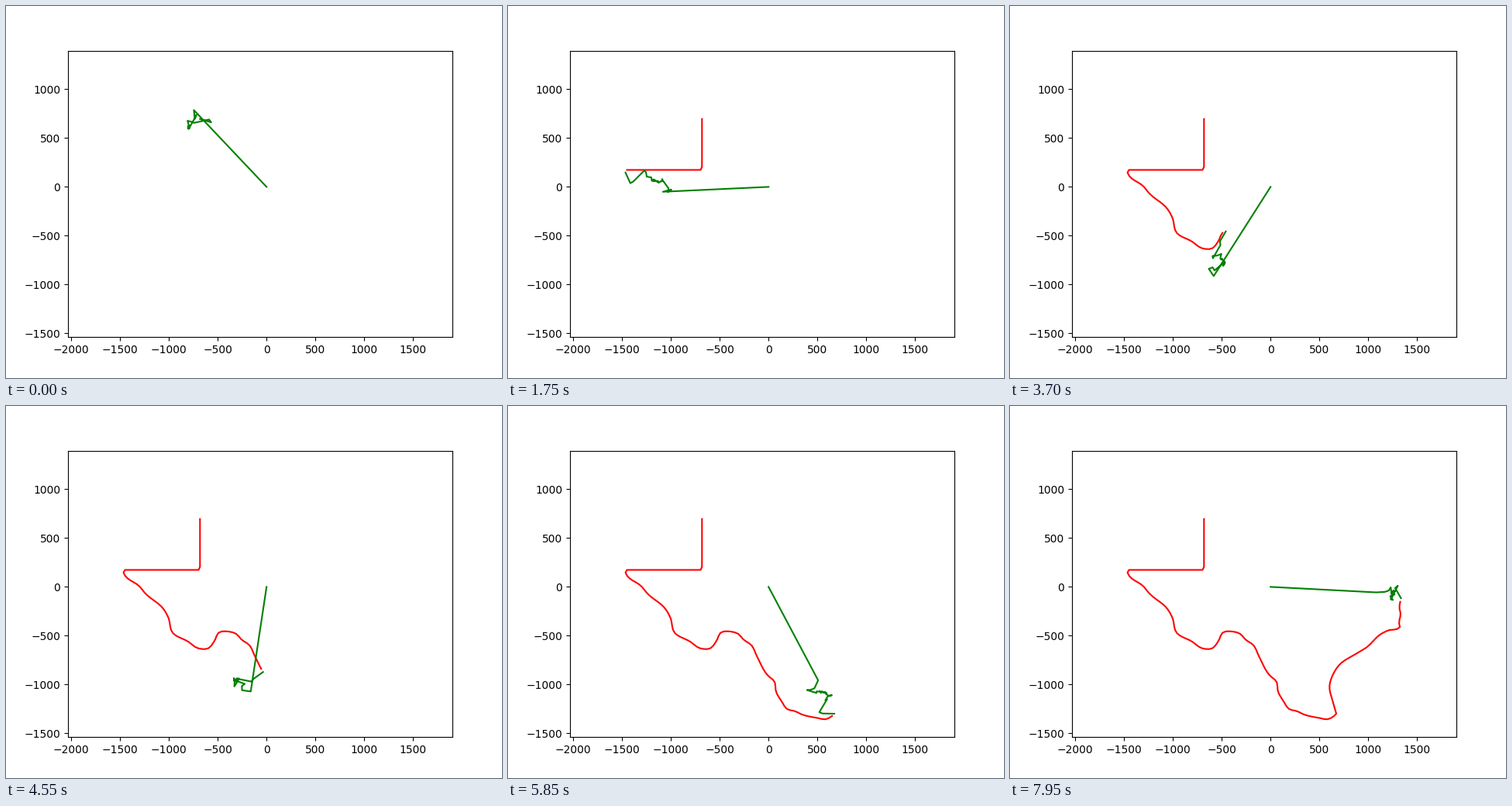
Recreate the animation shown at these times as a matplotlib script. Size 640 by 480 pixels, loop 8 s.

```python
import numpy as np
import matplotlib.pyplot as plt
from matplotlib.animation import FuncAnimation

N = 256             # samples round the whole outline
FRAMES = 160        # samples visited in one loop
SCALE = 0.126       # stage pixels per data unit
OX, OY = 336.2, 233.4

# Outline sections in stage pixels, in drawing order
WEST = [(250.3, 145.8), (250.3, 208.5), (249, 211.5), (153.5, 211.5), (151, 213.5)]
RIVER = [(151, 213.5), (153, 218), (172.5, 233), (179, 241), (204, 263), (209.5, 273),
         (214.5, 292), (235, 304), (247.5, 312.5), (261, 312.7), (268.5, 304),
         (275, 292), (287, 291), (297, 294), (304, 301.5), (314, 308.5),
         (321, 322.5), (336, 348.5), (343.5, 355), (346, 369), (353, 381),
         (360, 391), (371, 394), (378, 397.5), (399, 402.5), (410, 404.2),
         (421.3, 398)]
COAST = [(421.3, 398), (417, 383), (412.3, 361), (418, 344), (424.5, 334.5),
         (446, 320), (460, 311.5), (479, 294), (490, 289), (499, 288), (503, 285.5),
         (502, 280), (504, 268), (502.5, 261), (504.5, 248)]
NORTH = [(504.5, 248), (499, 229), (495, 211), (495, 165), (474, 160), (462, 155),
         (450, 159), (424, 160), (398, 151), (386, 153), (350, 140), (333, 133),
         (333, 81), (250.3, 81), (250.3, 145.8)]


def to_data(points):
    x, y = np.array(points, float).T
    return ((x - OX) + 1j * (OY - y)) / SCALE


def arc(z):
    return np.concatenate([[0], np.cumsum(np.abs(np.diff(z)))])


def smooth(z, steps=12):
    """Cubic Hermite curve through the points."""
    t = arc(z)
    m = np.gradient(z, t)
    h = np.diff(t)[:, None]
    u = np.linspace(0, 1, steps, endpoint=False)[None]
    a, b, ma, mb = z[:-1, None], z[1:, None], m[:-1, None], m[1:, None]
    curve = (a * (1 + 2 * u) * (1 - u) ** 2 + b * u**2 * (3 - 2 * u)
             + h * u * (1 - u) * (ma * (1 - u) - mb * u))
    return np.append(curve.ravel(), z[-1])


def resample(z, count):
    """Evenly spaced points along a path, without its end point."""
    s = arc(z)
    at = np.linspace(0, s[-1], count, endpoint=False)
    return np.interp(at, s, z.real) + 1j * np.interp(at, s, z.imag)


first = np.concatenate([to_data(WEST), smooth(to_data(RIVER))[1:],
                        smooth(to_data(COAST))[1:]])
z = np.concatenate([resample(first, FRAMES - 1),
                    resample(to_data(NORTH), N - FRAMES + 1)])

# Centre the outline on the origin by easing its northern part
ease = np.zeros(N)
ease[FRAMES:] = np.sin(np.linspace(0, np.pi, N - FRAMES)) ** 2
z -= z.sum() * ease / ease.sum()

coef = np.fft.fft(z) / N
k = np.arange(N)


def arms(n):
    turned = coef * np.exp(2j * np.pi * k * n / N)
    return np.concatenate([[0], np.cumsum(turned)])


fig, ax = plt.subplots(figsize=(6.4, 4.8), dpi=100)
ax.set_xlim((80 - OX) / SCALE, (576 - OX) / SCALE)
ax.set_ylim((OY - 427.2) / SCALE, (OY - 57.6) / SCALE)
trail, = ax.plot([], [], color="red")
chain, = ax.plot([], [], color="green")


def update(n):
    joints = arms(n)
    chain.set_data(joints.real, joints.imag)
    trail.set_data(z[:n].real, z[:n].imag)
    return trail, chain


anim = FuncAnimation(fig, update, frames=FRAMES, interval=50, repeat=True,
                     repeat_delay=0, blit=False)
plt.show()
```
